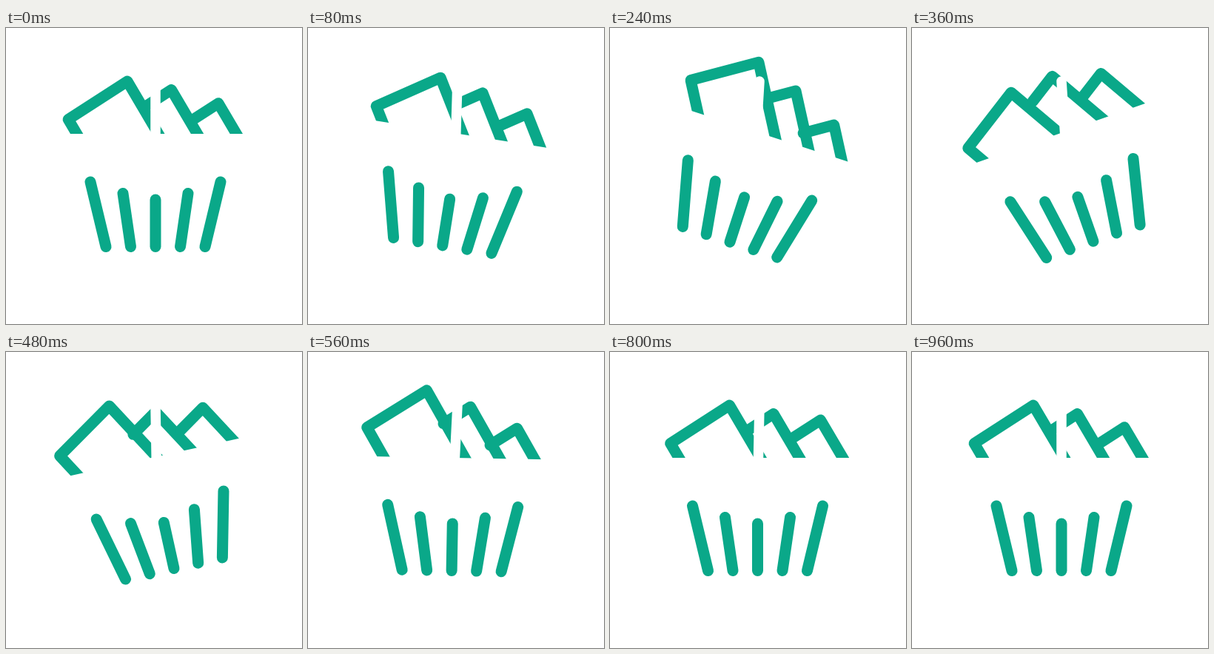
These frames come from a looping animation (400x400 px, 1040 ms). An HTML page with a canvas:

```html
<!DOCTYPE html>
<html lang="en">
<head>
<meta charset="utf-8">
<title>Swinging basket</title>
<style>
html, body { margin: 0; width: 100%; height: 100%; overflow: hidden; background: #fff; }
canvas { display: block; width: 400px; height: 400px; }
</style>
</head>
<body>
<canvas id="stage" width="400" height="400"></canvas>
<script>
const ctx = document.getElementById("stage").getContext("2d");
const LOOP = 1040, STEP = 40, END = 960;
const GREEN = "#0aa889", WHITE = "#fff";
const MID = 202, PIVOT = 166, RIM = 143, FLOOR = 172;
const HOOK = [MID, 72], JOINT = 23; // the handle meets the basket this far below the pivot
const EDGE = -32.8 * Math.PI / 180, WALL = 0.589;

const clamp = (v, low, high) => Math.max(low, Math.min(high, v));

// Eases in and out between [time, value] keys and holds the ends.
const ease = (...keys) => t => keys.reduce((value, [time, next], i) => {
  if (!i) return next;
  const [from] = keys[i - 1], u = clamp((t - from) / (time - from), 0, 1);
  return value + (next - keys[i - 1][1]) * u * u * (3 - 2 * u);
}, 0);

const tilt = ease([0, 0], [160, 18], [240, 18], [370, -20], [400, -20], [630, 7], [710, 0]);
const drift = ease([360, 0], [600, -6], [960, 0]);

// Every box hops twice, each one 80 ms after its neighbour.
const hop = (t, i) => -19.5 * Math.sin(Math.PI * clamp((t - 80 - 80 * i) / 320, 0, 2)) ** 2;

const boxes = [
  { x: 164, y: 72, top: 95, closed: true },
  { x: 223.5, y: 83.5, top: 43 },
  { x: 287, y: 101.7, top: 43 }
];

function line(color, width, ...points) {
  ctx.strokeStyle = color;
  ctx.lineWidth = width;
  ctx.beginPath();
  points.forEach(p => ctx.lineTo(...p));
  ctx.stroke();
}

function drawBox(box, rise) {
  const apex = [box.x, box.y + rise];
  const left = [apex[0] - box.top * Math.cos(EDGE), apex[1] - box.top * Math.sin(EDGE)];
  const foot = ([x, y]) => [x + (FLOOR - y) * WALL, FLOOR];
  const points = [left, apex, foot(apex)];
  if (box.closed) points.unshift(foot(left));
  line(GREEN, 15, ...points);
}

function drawBars() {
  for (let i = -2; i <= 2; i++) {
    const top = 232 - 8.5 * Math.abs(i) ** 1.5;
    line(GREEN, 15, [MID + 44 * i, top], [MID + 33.5 * i, 295.5]);
  }
}

function render(t) {
  const angle = tilt(t) * Math.PI / 180, x = MID + drift(t);
  const inBasket = draw => {
    ctx.save();
    ctx.translate(x, PIVOT);
    ctx.rotate(angle);
    ctx.translate(-MID, -PIVOT);
    draw();
    ctx.restore();
  };

  ctx.fillStyle = WHITE;
  ctx.fillRect(0, 0, 400, 400);
  ctx.lineCap = ctx.lineJoin = "round";

  inBasket(() => {
    boxes.forEach((box, i) => drawBox(box, hop(t, i)));
    ctx.fillRect(0, RIM, 400, 50);
  });
  line(WHITE, 13.5, HOOK, [x - JOINT * Math.sin(angle), PIVOT + JOINT * Math.cos(angle)]);
  inBasket(drawBars);
}

const start = performance.now();
function frame() {
  const t = (performance.now() - start) % LOOP;
  render(Math.min(END, Math.floor(t / STEP) * STEP));
  requestAnimationFrame(frame);
}
frame();
</script>
</body>
</html>
```
